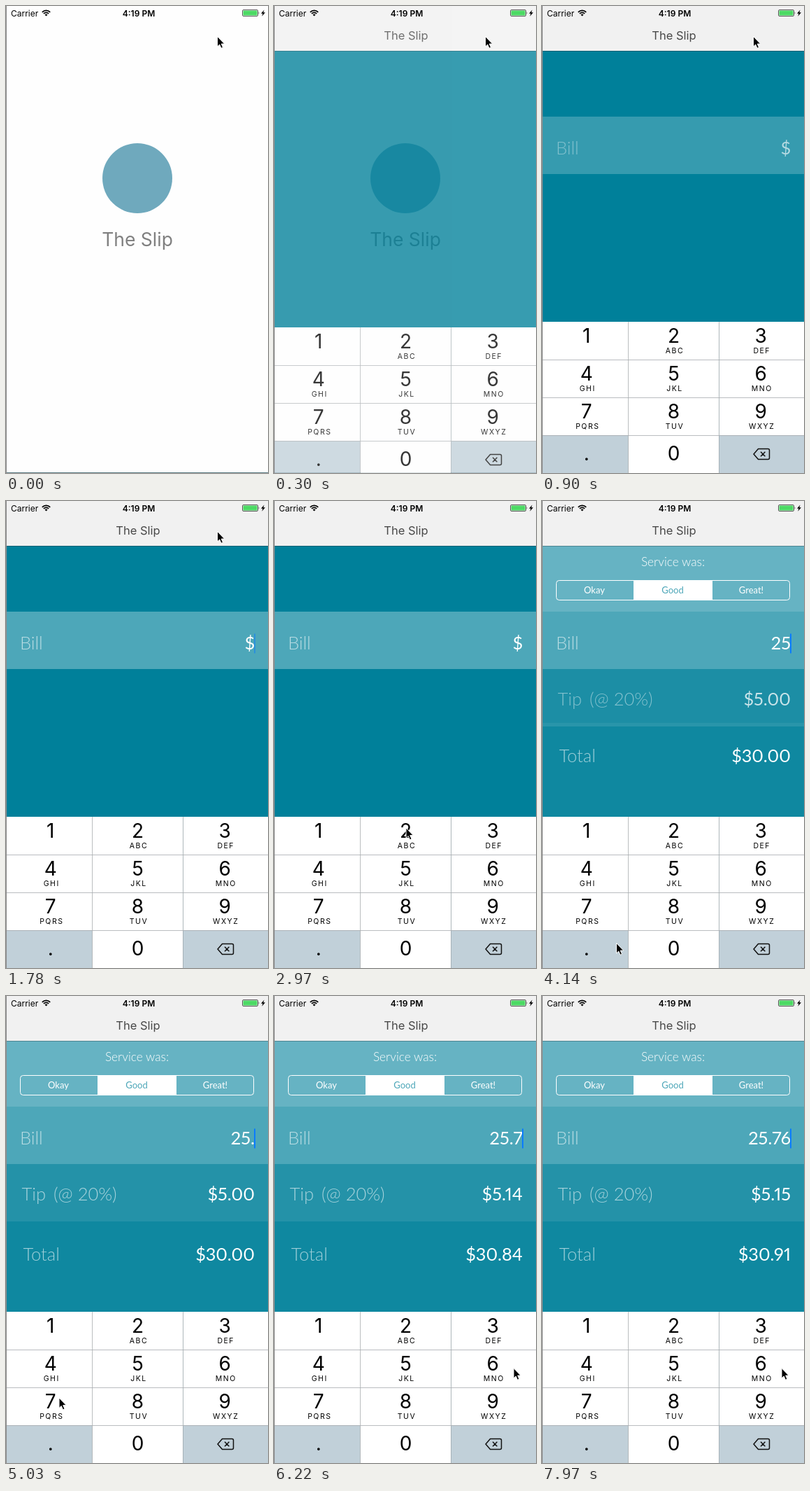
Recreate the animation shown at these times as an HTML page. Size 375x667 px, loop 8000 ms.

```html
<!DOCTYPE html>
<html lang="en">
<head>
<meta charset="utf-8">
<title>Tip calculator</title>
<style>
  html, body { margin: 0; width: 100%; height: 100%; overflow: hidden; background: #fff; }
  svg { display: block; width: 375px; height: 667px; }
  text { font-family: Inter, "Liberation Sans", sans-serif; fill: #000; }
  .mid { text-anchor: middle; }
  .app text { font-family: Lato, "Open Sans", sans-serif; font-weight: 300; fill: #fff; }
  .app .label { font-size: 25.5px; fill-opacity: .6; }
  .app .value { font-size: 25.4px; font-weight: 400; text-anchor: end; font-variant-numeric: proportional-nums; }
  .app .seg { font-size: 13px; font-weight: 400; text-anchor: middle; }
  .digit { font-size: 28px; text-anchor: middle; }
  .letters { font-size: 10.5px; letter-spacing: 1.5px; text-anchor: middle; }
</style>
</head>
<body>
<svg viewBox="0 0 375 667">
  <rect width="375" height="667" fill="#00809a"/>

  <g class="app">
    <g id="service">
      <rect y="64" width="375" height="94" fill="#fff" fill-opacity=".4"/>
      <g id="choices">
        <text class="mid" x="187.5" y="93" font-size="17.3">Service was:</text>
        <rect x="20.5" y="113.5" width="334" height="28" rx="4" fill="none" stroke="#fff"/>
        <rect x="131" y="113" width="113" height="29" fill="#fff"/>
        <text class="seg" x="75" y="132">Okay</text>
        <text class="seg" x="187" y="132" style="fill:#4ca6b8">Good</text>
        <text class="seg" x="299.5" y="132">Great!</text>
      </g>
    </g>
    <g id="total">
      <rect y="322" width="375" height="140" fill="#fff" fill-opacity=".06"/>
      <text class="label" x="24.5" y="378">Total</text>
      <text class="value" id="totalSum" x="356" y="378"></text>
    </g>
    <g id="tip">
      <rect y="240" width="375" height="82" fill="#fff" fill-opacity=".14"/>
      <text class="label" x="22.5" y="292">Tip</text>
      <text class="label" x="68" y="292">(@ 20%)</text>
      <text class="value" id="tipSum" x="356" y="292"></text>
    </g>
    <g id="bill">
      <rect y="158" width="375" height="82" fill="#fff" fill-opacity=".3"/>
      <text class="label" x="20" y="212">Bill</text>
      <text class="value" id="billSum" x="356" y="212"></text>
    </g>
    <rect id="caret" x="355" y="189.5" width="2" height="28" fill="#0a7cff"/>
  </g>

  <rect width="375" height="64" fill="#f1f1f1"/>
  <rect y="64" width="375" height="1" fill="#000" fill-opacity=".25"/>
  <text class="mid" x="189" y="48" font-size="16.5" style="fill:#484848">The Slip</text>

  <g id="pad"></g>

  <g id="splash">
    <rect width="375" height="667" fill="#fefefe"/>
    <circle cx="188" cy="246" r="50" fill="#6fa9bd"/>
    <text class="mid" x="188" y="343" font-size="26.5" style="fill:#808080">The Slip</text>
    <rect y="666" width="375" height="1" fill="#5f7f86"/>
  </g>

  <g id="status">
    <text x="7" y="14.5" font-size="12">Carrier</text>
    <path d="M51.8 8.8a8 8 0 0 1 11.4 0M53.9 11a5 5 0 0 1 7.2 0" fill="none" stroke="#000" stroke-width="1.8"/>
    <path d="M57.5 14.6l-2-2.1a2.9 2.9 0 0 1 4 0z"/>
    <text class="mid" x="190" y="14.5" font-size="12" font-weight="600">4:19 PM</text>
    <rect x="338.5" y="5.5" width="22" height="9" rx="1.5" fill="none" stroke="#333" stroke-width=".8"/>
    <rect x="339.5" y="6.5" width="20" height="7" rx=".6" fill="#4cd964"/>
    <path d="M361.7 8.3q1.5 1.7 0 3.4z" fill="#333"/>
    <path d="M369.5 5.5l-4.5 5.2h2.5l-1.2 4 4.7-5.5h-2.7z"/>
  </g>

  <rect width="1" height="667" fill="#8c8c8c"/>
  <path id="mouse" d="M0 0v14.5l3.2-3 2.3 5.3 2.5-1.1-2.3-5.1h4.5z" stroke="#fff" stroke-linejoin="round"/>
</svg>

<script>
const LOOP = 8000, GREY = '#c1d0d9';
const $ = id => document.getElementById(id);

// Number pad
const letters = ['', 'ABC', 'DEF', 'GHI', 'JKL', 'MNO', 'PQRS', 'TUV', 'WXYZ'];
const backspace = `<path d="M309.5 632.5h14q2 0 2 2v11q0 2-2 2h-14l-6.500-7.500z
  M313 636.8l6.4 6.4m0-6.4l-6.4 6.4" fill="none" stroke="#111" stroke-width="1.5" stroke-linejoin="round"/>`;

function keyMarkup(name, i) {
  const col = i % 3, row = Math.floor(i / 3);
  const x = col && 130 * col - 6.5, y = 451 + 54 * row;
  const mid = 188.5 + 126 * (col - 1) * .99;
  const fill = name === '.' || name === 'back' ? GREY : '#fff';
  const face = name === 'back' ? backspace
    : `<text class="digit" x="${mid}" y="${y + (row < 3 ? 30 : 36)}">${name}</text>`;
  const sub = letters[i] ? `<text class="letters" x="${mid + 1.5}" y="${y + 45}">${letters[i]}</text>` : '';
  return `<rect data-key="${name}" data-fill="${fill}" x="${x}" y="${y}" width="130" height="54"/>${face}${sub}`;
}

$('pad').innerHTML = [...'123456789.0', 'back'].map(keyMarkup).join('') +
  '<path d="M123.5 451v216M253.5 451v216M0 505.5h375M0 559.5h375M0 613.5h375" stroke="#a9adb0" stroke-width=".8"/>';
const keys = [...document.querySelectorAll('[data-key]')];

// Each tap: the pointer sets off at go and the key is down at press (in ticks)
const home = { x: 302.5, y: 43.5 };
const taps = [
  { key: '2', go: 13, press: 21, x: 189, y: 467 },
  { key: '5', go: 21, press: 24, x: 189, y: 517 },
  { key: '.', go: 24, press: 30, x: 106.5, y: 631.5 },
  { key: '7', go: 31, press: 38, x: 76, y: 574 },
  { key: '6', go: 39, press: 43, x: 343, y: 531.5 }
];

// Share of a move still to go: 1 at the start, eased out to 0
const rest = (k, from, length, power) =>
  (1 - Math.min(1, Math.max(0, (k - from) / length))) ** power;
const done = (...move) => 1 - rest(...move);

function pointer(k) {
  let { x, y } = home;
  for (const tap of taps) {
    const f = done(k, tap.go, 3, 3);
    x += (tap.x - x) * f;
    y += (tap.y - y) * f;
  }
  return [x, y];
}

// The caret blinks every 7 ticks, starting over with each digit
function caretAlpha(k, lastInput) {
  if (k < 7) return 0;
  const phase = (k - lastInput) % 7;
  return Math.min(1, Math.max(0, (5 - phase) / 2));
}

function place(id, opacity, y = 0) {
  $(id).setAttribute('opacity', opacity);
  $(id).setAttribute('transform', `translate(0 ${y})`);
}

function draw(ms) {
  // The screen refreshes in ticks of about 147 ms
  const k = Math.floor(Math.max(ms / 150, (ms - 20) / 147));
  place('splash', rest(k, 0, 4, 2.2));
  place('pad', 1, 216 * rest(k, 0, 4, 4.75));
  place('bill', done(k, 5, 3, 3));
  place('service', done(k, 21, 4, 1));
  place('choices', done(k, 21, 5, 2));
  place('tip', done(k, 22, 8, 1.1), -40 * rest(k, 22, 4, 2));
  place('total', done(k, 22, 6, 1), -82 * rest(k, 22, 8, 2));
  $('mouse').setAttribute('transform', `translate(${pointer(k)})`);

  const past = taps.filter(tap => tap.press < k);
  const typed = past.map(tap => tap.key).join('');
  const tip = Math.round(typed * 20) / 100;
  $('billSum').textContent = typed || '$';
  $('tipSum').textContent = '$' + tip.toFixed(2);
  $('totalSum').textContent = '$' + (+typed + tip).toFixed(2);
  place('caret', caretAlpha(k, past.length ? past.at(-1).press + 1 : 7));

  const down = taps.find(tap => tap.press === k);
  for (const rect of keys) {
    const { key, fill } = rect.dataset;
    const pressed = fill === GREY ? '#fff' : GREY;
    rect.setAttribute('fill', down && down.key === key ? pressed : fill);
  }
}

const start = performance.now();
function loop() {
  draw((performance.now() - start) % LOOP);
  requestAnimationFrame(loop);
}
loop();
</script>
</body>
</html>
```
